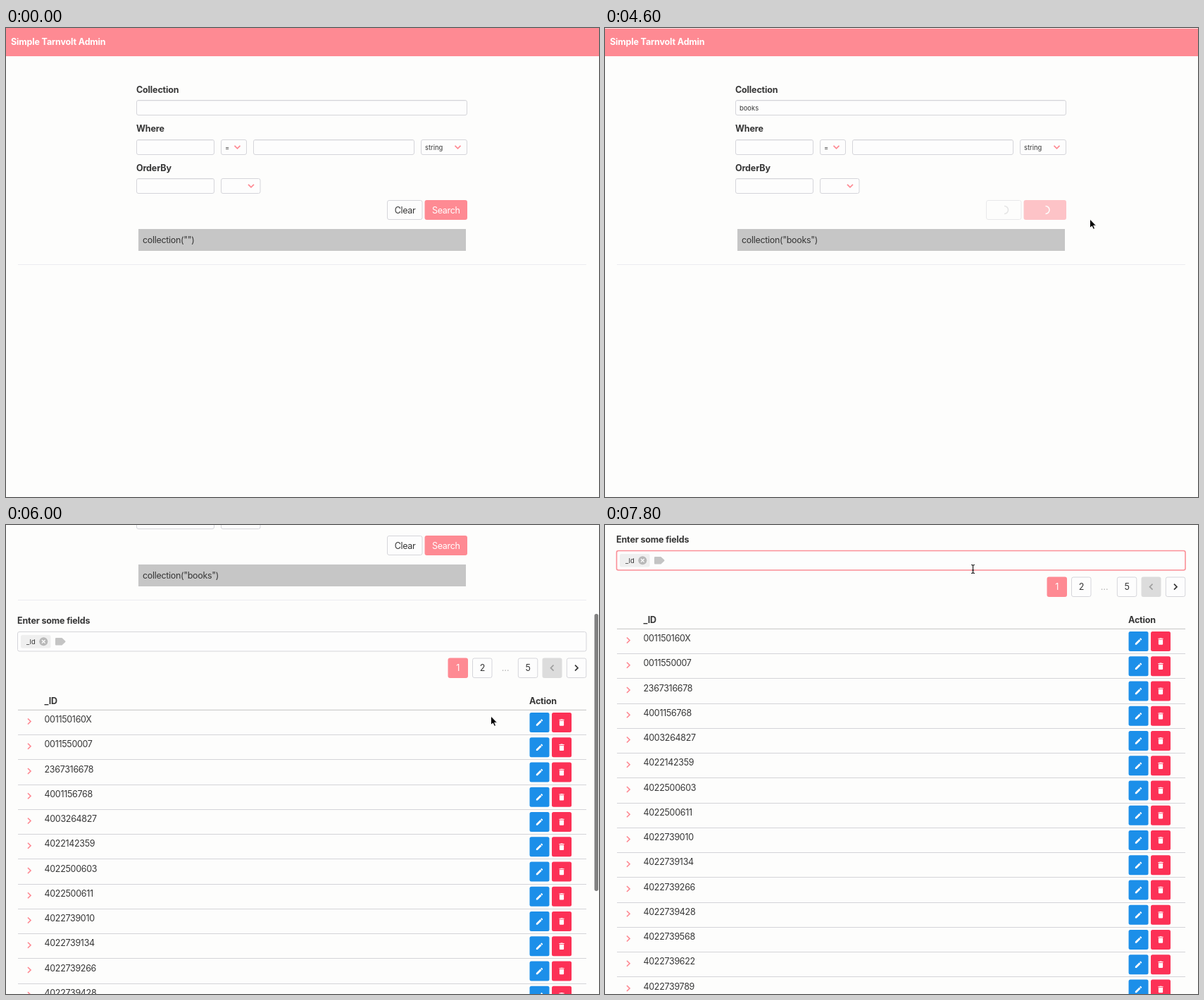
An HTML page that plays this animation: 842 by 665 pixels, repeating every 8000 ms.

```html
<!DOCTYPE html>
<html lang="en">
<head>
<meta charset="utf-8">
<title>Collection admin</title>
<style>
  html, body { margin: 0; width: 100%; height: 100%; overflow: hidden; background: #fdfdfc; }
  svg { display: block; width: 842px; height: 665px; }
  text { font: 12.5px Inter, "Open Sans", sans-serif; letter-spacing: -.025em; fill: #363636; white-space: pre; }
  text.bold { font-weight: 700; letter-spacing: -.012em; }
  text.small { font-size: 9.4px; letter-spacing: 0; }
  .mid { text-anchor: middle; }
  text.white { fill: #fff; }
  text.muted { fill: #b0b0b0; }
  .box { fill: #fdfdfd; stroke: #d5d5da; }
  .box.hover { stroke: #aeaeb2; }
  .box.focus { stroke: #fb8f97; stroke-width: 1.6; }
  .chevron { fill: none; stroke-width: 1.7; }
</style>
</head>
<body>
<svg id="stage" viewBox="0 0 842 665"></svg>
<script>
const PINK = '#fe8a93', LOOP = 8000, STEP = 200;
const IDS = ['001150160X', '0011550007', '2367316678', '4001156768', '4003264827',
  '4022142359', '4022500603', '4022500611', '4022739010', '4022739134',
  '4022739266', '4022739428', '4022739568', '4022739622', '4022739789'];
const PENCIL = 'M20.7 7c.4-.4.4-1 0-1.4l-2.3-2.3c-.4-.4-1-.4-1.4 0l-1.9 1.8 3.8 3.8M3 17.2V21h3.8L17.8 9.9l-3.7-3.7z';
const TRASH = 'M19 4h-3.5l-1-1h-5l-1 1H5v2h14M6 19a2 2 0 0 0 2 2h8a2 2 0 0 0 2-2V7H6z';

const text = (x, y, content, cls = '', id = '') =>
  `<text x="${x}" y="${y}" class="${cls}" id="${id}">${content}</text>`;
const rect = (x, y, w, h, fill, r = 0) =>
  `<rect x="${x}" y="${y}" width="${w}" height="${h}" rx="${r}" fill="${fill}"/>`;
const box = (x, y, w, h, id = '') =>
  `<rect x="${x}" y="${y}" width="${w}" height="${h}" rx="2.5" class="box" id="${id}"/>`;
const line = (x1, x2, y, color) => `<path d="M${x1} ${y}H${x2}" stroke="${color}"/>`;
const input = (x, y, w, id) =>
  box(x, y, w, 21, id) + line(x + 1.5, x + w - 1.5, y + 1, '#f0f0f2');
const chevron = (x, y, angle, color) =>
  `<path class="chevron" d="M-2 -4L2 0L-2 4" stroke="${color}" transform="translate(${x} ${y}) rotate(${angle})"/>`;
const select = (x, y, w, label = '') =>
  box(x, y, w, 21) + text(x + 5.5, y + 14, label, 'small') + chevron(x + w - 13, y + 10.3, 90, PINK);
const icon = (x, y, d) =>
  `<path d="${d}" fill="#fff" transform="translate(${x - 6.25} ${y - 6.25}) scale(.52)"/>`;
const spinner = (x, color) =>
  `<g transform="translate(${x} 258)"><path class="spin" d="M0 -5.5A5.5 5.5 0 0 1 0 5.5" fill="none" stroke="${color}" stroke-width="1.5"/></g>`;
const pageButton = (x, label) => box(x, 418, 27.5, 27.5) + text(x + 13.8, 436.3, label, 'mid');

const form = `
  ${rect(0, 0, 842, 40, PINK)}
  ${text(7, 24.3, 'Simple Tarnvolt Admin', 'bold white')}
  ${text(185, 91.5, 'Collection', 'bold')} ${input(185.5, 102.5, 469, 'collection')}
  ${text(191, 116.6, '', 'small', 'typed')}
  <path id="caret" d="M0 107.5V118.5" stroke="#222"/>
  ${text(185, 147, 'Where', 'bold')}
  ${input(185.5, 158.5, 110)} ${select(305.5, 158.5, 36, '=')}
  ${input(351.5, 158.5, 228)} ${select(589.5, 158.5, 65, 'string')}
  ${text(185, 202.7, 'OrderBy', 'bold')}
  ${input(185.5, 213.5, 110)} ${select(305.5, 213.5, 55.5)}
  <g id="idle">${text(566.5, 262.7, 'Clear', 'mid')}</g>
  <g id="buttons">
    ${box(541.5, 244.5, 49.5, 27)} ${rect(594.5, 244, 60.5, 28, PINK, 3)}
    <g id="labels">${text(566.5, 262.7, 'Clear', 'mid')}${text(624.8, 262.7, 'Search', 'mid white')}</g>
    <g id="spinners">${spinner(567, '#cfcfcf')}${spinner(625.5, '#fff')}</g>
  </g>
  ${rect(188, 285, 465, 31, '#c6c6c6')}
  ${text(194, 305, '', '', 'query')}
  ${line(17, 824, 335.5, '#ececf0')}`.replace(/<g id="idle">.*?<\/g>/, '');

const tableRow = (id, i) => {
  const y = 491 + i * 35.25;
  return text(54.5, y + 18.2, id) + chevron(33, y + 16.5, 0, PINK) +
    rect(743.5, y + 4, 28, 28, '#1c8fe9', 2.5) + icon(757.5, y + 18, PENCIL) +
    rect(775, y + 4, 28, 28, '#fc3156', 2.5) + icon(789, y + 18, TRASH) +
    line(17, 824, Math.round(y + 35) + .5, '#d4d4d8');
};

const results = `
  ${text(16, 369, 'Enter some fields', 'bold')}
  ${box(16.5, 380.5, 807.5, 27.5, 'fields')}
  ${rect(21, 385, 42.5, 18.5, '#efefef', 2.5)}
  ${text(29, 398.3, '_Id', 'small')}
  <circle cx="53.3" cy="394.3" r="6" fill="#b8b8b8"/>
  <path d="M51 392l4.6 4.6m0-4.6L51 396.600" stroke="#fff" stroke-width="1.3"/>
  <path d="M71 390h8l4.500 4.300-4.500 4.300h-8z" fill="#c4c4c4" stroke="#c4c4c4" stroke-width="2" stroke-linejoin="round"/>
  ${rect(627.5, 417.5, 28.5, 28.5, PINK, 3)} ${text(641.7, 436.3, '1', 'mid white')}
  ${pageButton(662.5, '2')} ${text(709, 436.3, '…', 'mid muted')} ${pageButton(727.3, '5')}
  ${rect(761.5, 417.5, 28, 28.5, '#dcdcdc', 3)} ${chevron(775.5, 431.7, 180, '#a0a0a0')}
  ${pageButton(796.3, '')} ${chevron(810, 431.7, 0, '#363636')}
  ${text(54.5, 482.8, '_ID', 'bold')} ${text(743, 482.8, 'Action', 'bold')}
  ${line(17, 824, 491.3, '#c4c4c4')}
  ${IDS.map(tableRow).join('')}`;

const pointers = `
  <path id="arrow" d="M0 0V12.500L2.900 9.900L4.900 14.300L7 13.400L5.100 9.200H9Z" fill="#000" stroke="#fff" stroke-width=".9"/>
  <path id="beam" d="M-2.500 -6Q0 -6 0 -4.500Q0 -6 2.500 -6M0 -4.500V4.500M-2.500 6Q0 6 0 4.500Q0 6 2.500 6M-1.500 1.500H1.500" fill="none" stroke="#222" stroke-width="1.2"/>
  <path id="hand" d="M-1.500 1Q0 -1 1.500 1V6L7 7.500Q8.500 8 8 10L7 15H0L-4.500 9Q-4 7 -1.500 9Z" fill="#fff" stroke="#000"/>`;

document.getElementById('stage').innerHTML = `
  ${rect(0, 0, 842, 665, '#fdfdfc')}
  <g id="page">${form}<g id="results">${results}</g></g>
  <path id="progress" d="M0 .5H842" stroke="#fee3e5"/>
  <rect id="scrollbar" x="835.5" width="5.500" height="393" rx="2.700" fill="#808080"/>
  <g id="pointer">${pointers}</g>`;

const $ = id => document.getElementById(id);
const show = (id, visible) => $(id).setAttribute('display', visible ? 'inline' : 'none');
const move = (id, x, y) => $(id).setAttribute('transform', `translate(${x} ${y})`);

// Each key is [time, ...values]; values are blended between neighbouring keys.
const SCROLL = [[5200, 0], [5400, 30], [5600, 130.5], [5800, 190], [6000, 229],
  [6200, 259], [6400, 285], [6600, 309.5], [6800, 331], [7000, 344]];
const POINTER = [[200, 345, 380], [600, 280, 230], [1000, 235, 115], [1200, 233.5, 108],
  [3000, 233.5, 108], [3400, 430, 180], [3800, 625, 258], [4200, 625, 258],
  [4600, 688.5, 271], [6800, 688.5, 271], [7200, 610, 150], [7600, 522.5, 62.500]];

function sample(keys, t) {
  const next = keys.findIndex(key => key[0] > t);
  if (next === 0) return keys[0].slice(1);
  if (next < 0) return keys.at(-1).slice(1);
  const a = keys[next - 1], b = keys[next];
  const k = (t - a[0]) / (b[0] - a[0]);
  return a.slice(1).map((value, i) => value + (b[i + 1] - value) * k);
}

function draw(t) {
  const [scroll] = sample(SCROLL, t);
  const [x, y] = sample(POINTER, t);
  const loading = t >= 4000 && t < 4800;
  const typing = t >= 1400 && t < 4000;
  const pageY = y + scroll;
  const inside = (left, top, right, bottom) => x > left && x < right && pageY > top && pageY < bottom;

  move('page', 0, -scroll);
  show('results', t >= 4800);
  show('scrollbar', t >= 5400 && t < 7800);
  $('scrollbar').setAttribute('y', .5 + scroll * .5475);

  const word = 'books'.slice(0, Math.max(0, (t - 1600) / STEP));
  $('typed').textContent = word;
  $('query').textContent = `collection("${word}")`;
  show('caret', typing);
  move('caret', 191.5 + (word ? $('typed').getComputedTextLength() : 0), 0);

  const overCollection = inside(185, 102, 655, 124);
  const overFields = t >= 4800 && inside(16, 380, 824, 408);
  const state = (focused, hovered) => 'box' + (focused ? ' focus' : hovered ? ' hover' : '');
  $('collection').setAttribute('class', state(typing, t >= 200 && overCollection));
  $('fields').setAttribute('class', state(t >= 7800, overFields));

  $('buttons').setAttribute('opacity', loading ? .5 : 1);
  show('labels', !loading);
  show('spinners', loading);
  show('progress', loading);
  for (const arc of document.querySelectorAll('.spin'))
    arc.setAttribute('transform', `rotate(${(t - 4600) * .72})`);

  const overSearch = inside(594, 244, 655, 272);
  const overInput = overCollection || overFields;
  show('pointer', t >= 200 && (t < 1800 || t >= 3200));
  move('pointer', x, y);
  show('beam', overInput);
  show('hand', overSearch);
  show('arrow', !overInput && !overSearch);
}

function tick() {
  const t = performance.now() % LOOP;
  draw(Math.floor(t / STEP) * STEP);
  requestAnimationFrame(tick);
}
tick();
</script>
</body>
</html>
```
